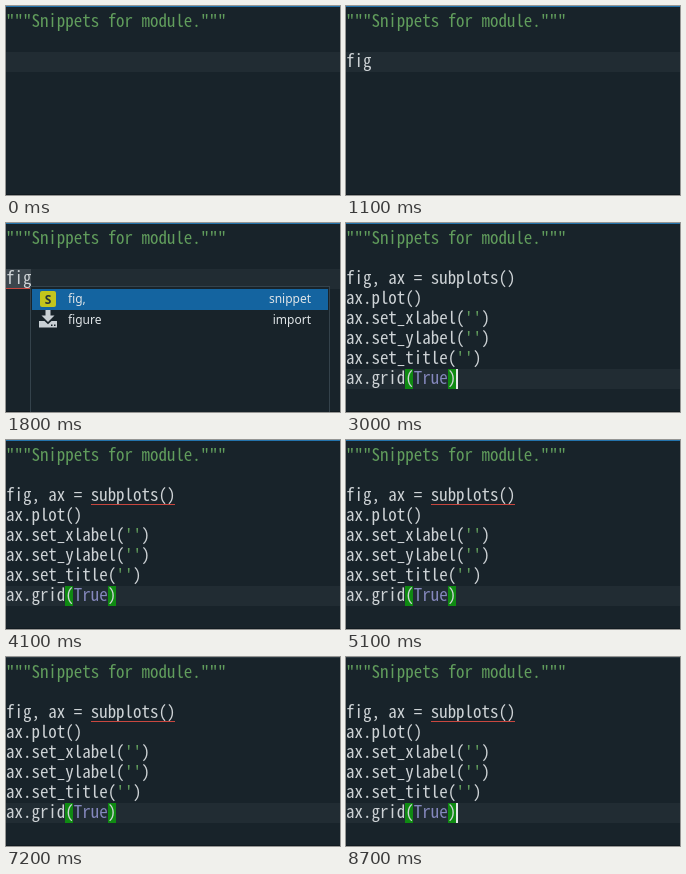
An HTML page with a canvas for the animation above (9000 ms loop, 334 by 189 pixels).

```html
<!DOCTYPE html>
<html lang="en">
<head>
<meta charset="utf-8">
<title>Snippet completion</title>
<style>
html, body { margin: 0; width: 100%; height: 100%; overflow: hidden; background: #18232a; }
canvas { display: block; width: 334px; height: 189px; }
</style>
</head>
<body>
<canvas id="stage"></canvas>
<script>
const W = 334, H = 189, LOOP = 9000;
const PITCH = 8.47, ROW = 20, TOP = 6;
const BG = '#18232a', BAND = '#212c33', TEXT = '#ced3d6', GREEN = '#619d5c',
      PURPLE = '#8588bd', RED = '#c8473f', BLUE = '#1464a0', MATCH = '#0f8a12';
const MONO = '"Noto Sans Mono CJK JP", "Noto Sans Mono CJK SC", "Noto Sans Mono", monospace';
const UI = '12px "Noto Sans", "Open Sans", sans-serif';

const canvas = document.getElementById('stage');
const ctx = canvas.getContext('2d');
const dpr = window.devicePixelRatio || 1;
canvas.width = W * dpr;
canvas.height = H * dpr;
ctx.scale(dpr, dpr);

// Font size that gives the editor's character pitch
ctx.font = '100px ' + MONO;
const codeFont = (100 * PITCH / ctx.measureText('0').width).toFixed(2) + 'px ' + MONO;

const typing = [[0, ''], [700, 'f'], [800, 'fi'], [1000, 'fig']];
const caretSteps = [
  [0, 0], [100, 1], [600, 0], [700, 1], [1100, 0], [3000, 1], [3500, 0], [3600, 1],
  [4100, 0], [4600, 1], [5100, 0], [5700, 1], [6200, 0], [6600, 1],
  [7200, 0], [7600, 1], [8200, 0], [8700, 1]
];

function at(steps, t) {
  let value = steps[0][1];
  for (const [start, v] of steps) if (t >= start) value = v;
  return value;
}

function rect(x, y, w, h, color) {
  ctx.fillStyle = color;
  ctx.fillRect(x, y, w, h);
}

function label(text, x, y, color, font, align = 'left') {
  ctx.font = font;
  ctx.textAlign = align;
  ctx.fillStyle = color;
  ctx.fillText(text, x, y);
}

const rowY = row => TOP + row * ROW;

function code(row, col, text, color = TEXT) {
  label(text, col * PITCH, rowY(row) + 15, color, codeFont);
}

function band(row) {
  rect(0, rowY(row), W, ROW, BAND);
}

function caret(row, col, t) {
  if (at(caretSteps, t)) rect(Math.round(col * PITCH), rowY(row), 2, ROW, '#e6e9ea');
}

function snippetIcon() {
  ctx.fillStyle = '#c3c51c';
  ctx.beginPath();
  ctx.roundRect(34, 68, 16, 16, 2);
  ctx.fill();
  label('S', 42, 80.5, '#26323a', 'bold 12px "Noto Sans", sans-serif', 'center');
}

function importIcon() {
  const color = '#c9d0d5';
  rect(39.5, 87, 5, 6, color);
  ctx.beginPath();
  ctx.moveTo(35.5, 92.5);
  ctx.lineTo(48.5, 92.5);
  ctx.lineTo(42, 99);
  ctx.fill();
  ctx.beginPath();
  ctx.moveTo(33, 98);
  ctx.lineTo(38.5, 98);
  ctx.lineTo(42, 101.3);
  ctx.lineTo(45.5, 98);
  ctx.lineTo(51, 98);
  ctx.lineTo(51, 104.5);
  ctx.lineTo(33, 104.5);
  ctx.fill();
  rect(45, 101.5, 1.5, 1.5, BG);
  rect(48, 101.5, 1.5, 1.5, BG);
}

function popup() {
  rect(24, 63, 300, 130, '#34424b');
  rect(25, 64, 298, 130, BG);
  rect(26, 66, 296, 21, BLUE);
  snippetIcon();
  importIcon();
  [['fig,', 'snippet'], ['figure', 'import']].forEach(([name, kind], i) => {
    const y = 80 + i * 21;
    label(name, 62, y, '#dfe4e7', UI);
    label(kind, 305, y, '#dfe4e7', UI, 'right');
  });
}

function typed(t) {
  const word = at(typing, t);
  band(2);
  if (t >= 1800) {
    rect(0, rowY(2), 25, ROW, '#3c464d');
    rect(0, 65, 25, 1, RED);
  }
  code(2, 0, word);
  caret(2, word.length, t);
  if (t >= 1300) popup();
}

function expanded(t) {
  band(7);
  code(2, 0, 'fig, ax = subplots()');
  code(3, 0, 'ax.plot()');
  ['xlabel', 'ylabel', 'title'].forEach((name, i) => {
    const call = 'ax.set_' + name + '(';
    code(4 + i, 0, call);
    code(4 + i, call.length, "''", GREEN);
    code(4 + i, call.length + 2, ')');
  });
  for (const col of [7, 12]) rect(Math.round(col * PITCH), rowY(7), 8, ROW, MATCH);
  code(7, 0, 'ax.grid(');
  code(7, 8, 'True', PURPLE);
  code(7, 12, ')');
  if (t >= 3600) rect(85, 64, 84, 1, RED);
  caret(7, 13, t);
}

function draw(t) {
  rect(0, 0, W, H, BG);
  rect(0, H - 1, W, 1, '#111a20');
  rect(0, 0, W, 1, t < 6700 ? '#2474ad' : '#2b3941');
  code(0, 0, '"""Snippets for module."""', GREEN);
  if (t < 3000) typed(t);
  else expanded(t);
}

const began = performance.now();
function tick() {
  draw((performance.now() - began) % LOOP);
  requestAnimationFrame(tick);
}
tick();
</script>
</body>
</html>
```
